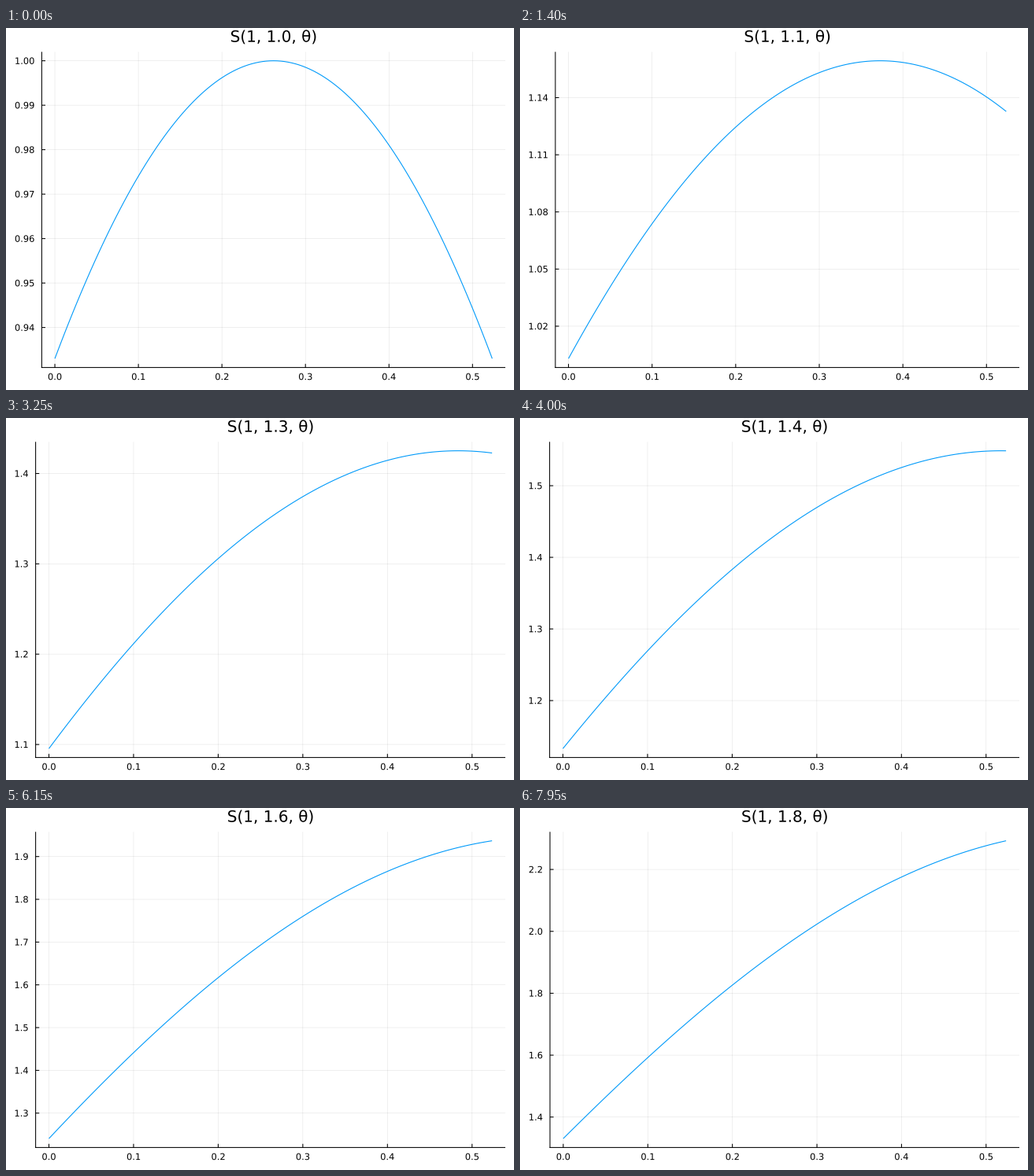
Animation of 645 by 460 pixels, one loop 8 s. Source, as a matplotlib script:

```python
import math

import matplotlib.pyplot as plt
import numpy as np
from matplotlib.animation import FuncAnimation
from matplotlib.patches import PathPatch
from matplotlib.textpath import TextPath
from matplotlib.transforms import Affine2D

W, H, DPI = 645, 460, 64
PT = 72 / DPI                       # points per pixel
FRAMES, INTERVAL = 160, 50
TOP, BOTTOM, RIGHT = 30.3, 431.4, 634.0
INK_LEFT, LABEL_GAP, TICK = 11.7, 9.0, 4.6
TICK_SIZE, TITLE_SIZE = 11.43, 20.0
THETA = np.linspace(0, math.pi / 6, 121)
NICE = [(1, 1.0), (5, 0.9), (2, 0.7), (2.5, 0.5), (3, 0.2)]

fig = plt.figure(figsize=(W / DPI, H / DPI), dpi=DPI, facecolor="white")
ax = fig.add_axes([0, 0, 1, 1])


def area(a, b, t):
    return (a * b + a * a * np.sin(math.pi / 3 - 2 * t) + b * b * np.sin(2 * t)) / 2


def widen(lo, hi):
    pad = 0.03 * (hi - lo)
    return lo - pad, hi + pad


def find_ticks(lo, hi):
    """Pick 4 to 8 round ticks, weighing count, coverage and niceness."""
    span, best, top_score = hi - lo, None, -1
    for z in range(-3, 1):
        for q, nice in NICE:
            step = q * 10.0 ** z
            first, last = math.ceil(lo / step), math.floor(hi / step)
            n = last - first + 1
            if not 4 <= n <= 8:
                continue
            score = (1 - abs(n - 5) / 5) / 4 + 0.5 * span / ((n - 1) * step) + nice / 4
            if score > top_score:
                top_score = score
                best = np.arange(first, last + 1) * step
    return best


def tick_labels(ticks):
    places = 1
    while np.abs(ticks - np.round(ticks, places)).max() > 1e-9:
        places += 1
    return [f"{v:.{places}f}" for v in ticks]


def line(xs, ys, color="black", width=1.05, alpha=1.0):
    ax.plot(xs, ys, color=color, lw=width * PT, alpha=alpha, snap=False,
            solid_capstyle="butt", solid_joinstyle="round")


def put(path, x, baseline):
    move = Affine2D().scale(1, -1).translate(x, baseline)
    ax.add_patch(PathPatch(move.transform_path(path), fc="black", lw=0, snap=False))


def put_centered(text, size, x, baseline):
    path = TextPath((0, 0), text, size=size)
    box = path.get_extents()
    put(path, x - (box.x0 + box.x1) / 2, baseline)


def draw(i):
    ax.cla()
    ax.axis("off")
    ax.set_xlim(0, W)
    ax.set_ylim(H, 0)

    b = 1 + 0.005 * i
    s = area(1, b, THETA)
    x_lo, x_hi = widen(THETA[0], THETA[-1])
    y_lo, y_hi = widen(s.min(), s.max())
    x_ticks = np.arange(6) / 10
    y_ticks = find_ticks(y_lo, y_hi)

    # The left axis makes room for the widest label.
    names = tick_labels(y_ticks)
    paths = [TextPath((0, 0), name, size=TICK_SIZE) for name in names]
    advance = TICK_SIZE * (0.636 * (len(names[0]) - 1) + 0.318)
    start = INK_LEFT - min(p.get_extents().x0 for p in paths)
    left = start + advance + LABEL_GAP

    def px(x):
        return left + (x - x_lo) / (x_hi - x_lo) * (RIGHT - left)

    def py(y):
        return BOTTOM - (y - y_lo) / (y_hi - y_lo) * (BOTTOM - TOP)

    for x in px(x_ticks):
        line([x, x], [TOP, BOTTOM], width=0.6, alpha=0.1)
    for y in py(y_ticks):
        line([left, RIGHT], [y, y], width=0.6, alpha=0.1)

    line([left, left], [TOP, BOTTOM + 0.5])
    line([left - 0.5, RIGHT], [BOTTOM, BOTTOM])
    for x, v in zip(px(x_ticks), x_ticks):
        line([x, x], [BOTTOM, BOTTOM - TICK])
        put_centered(f"{v:.1f}", TICK_SIZE, x, 447.1)
    for y, path in zip(py(y_ticks), paths):
        line([left, left + TICK], [y, y])
        put(path, start, y + 0.365 * TICK_SIZE)

    line(px(THETA), py(s), color="#009AFA", width=1.1)
    title = f"S(1, {np.round(b, 1):.1f}, θ)"
    put_centered(title, TITLE_SIZE, (left + RIGHT) / 2, 17.7)
    return []


anim = FuncAnimation(fig, draw, frames=FRAMES, interval=INTERVAL,
                     init_func=lambda: draw(0), repeat=True, repeat_delay=0)
plt.show()
```
